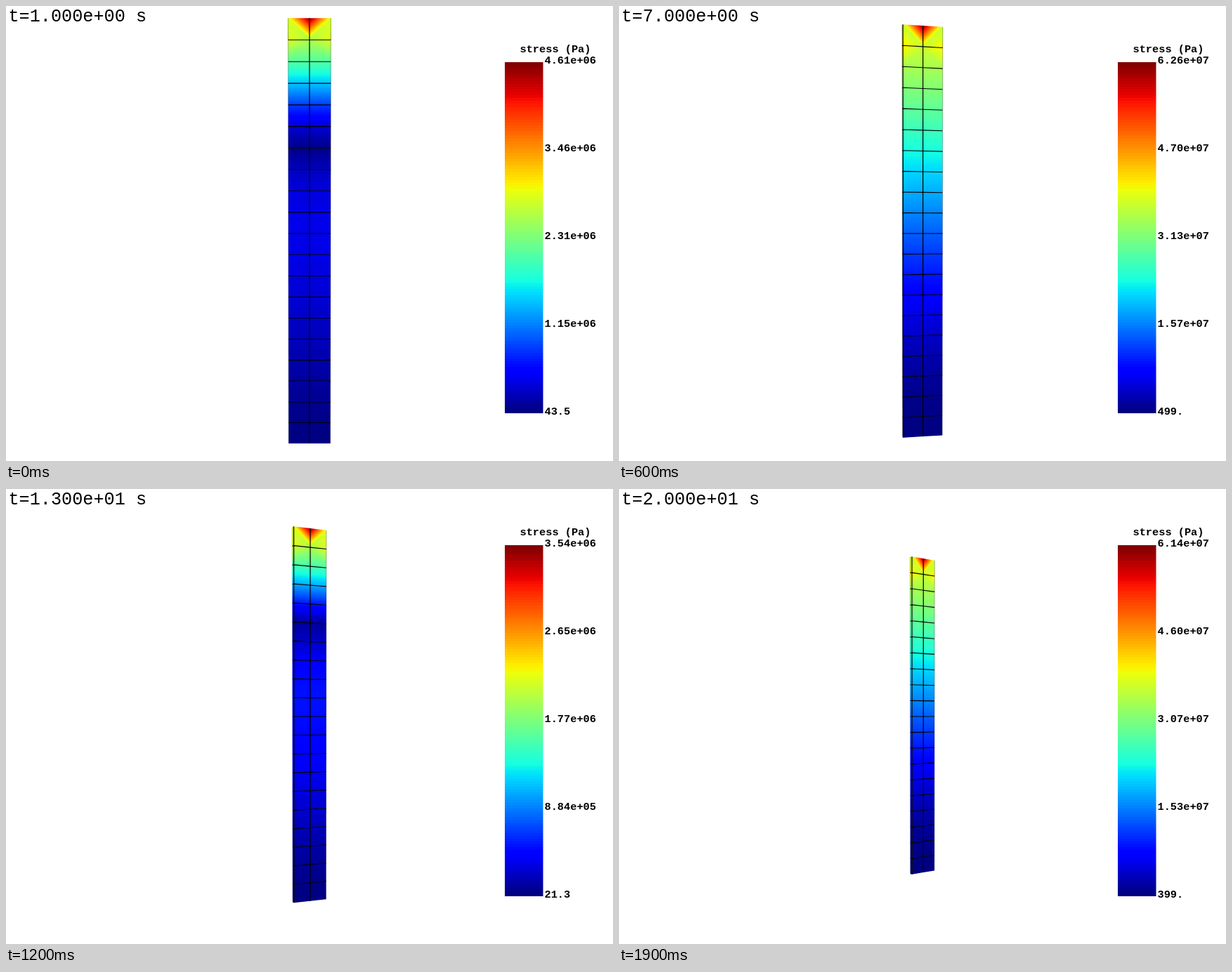
Write an HTML page with a canvas that moves like this. It is 864 by 648 pixels and loops after 2000 ms.

```html
<!DOCTYPE html>
<html lang="en">
<head>
<meta charset="utf-8">
<title>Beam stress</title>
<style>
  html, body { margin: 0; width: 100%; height: 100%; overflow: hidden; background: #fff; }
  canvas, svg { position: absolute; left: 0; top: 0; width: 864px; height: 648px; }
  text { font-family: "Liberation Mono", "Courier New", monospace; white-space: pre; }
  #clock { font-size: 25.2px; }
  #bar text { font-size: 15.3px; font-weight: bold; }
</style>
</head>
<body>
<canvas id="stage" width="864" height="648"></canvas>
<svg viewBox="0 0 864 648">
  <text id="clock" x="3.5" y="22"></text>
  <g id="bar"><text x="731.5" y="66">stress (Pa)</text></g>
</svg>
<script>
const ctx = document.getElementById('stage').getContext('2d');
const clock = document.getElementById('clock');
const ROWS = 20, SECONDS = 20, STEP_MS = 100;
const HALF = { width: 30, height: 302.3, depth: 2.4 };

// Key loads: second, peak stress (1e7 Pa), lowest stress (Pa), share of the bent profile
const LOADS = [
  [1, .4612, 43.5, 0],
  [3, 2.48, 96.1, .85],
  [7, 6.262, 499, 1],
  [10, 3, 180, .93],
  [13, .3537, 21.3, -.14],
  [15, 2.04, 5.84, .7],
  [20, 6.137, 399, 1]
];

const mix = (a, b, u) => a + (b - a) * u;
const clamp = v => Math.min(1, Math.max(0, v));

function jet(v) {
  const r = Math.min((v - .35) / .31, .5 + (1 - v) / .22);
  const g = Math.min((v - .125) / .25, (.91 - v) / .27);
  const b = Math.min(.5 + v / .22, (.65 - v) / .31);
  return `rgb(${[r, g, b].map(c => Math.round(255 * clamp(c)))})`;
}

// The beam swings freely; the key loads correct the ideal swing
const swing = sec => 6.2 * Math.sin(Math.PI * sec / 12.8) ** 2;

function loadAt(sec) {
  const i = Math.min(LOADS.length - 2, LOADS.findLastIndex(k => k[0] <= sec));
  const a = LOADS[i], b = LOADS[i + 1], u = (sec - a[0]) / (b[0] - a[0]);
  return {
    peak: swing(sec) + mix(a[1] - swing(a[0]), b[1] - swing(b[0]), u),
    low: mix(a[2], b[2], u),
    bend: mix(a[3], b[3], u)
  };
}

// Curvature of a cantilever's first mode, s = 0 at the clamp and 1 at the tip
function bent(s) {
  const x = 1.8751 * s;
  return .32 * (Math.cosh(x) + Math.cos(x) - .7341 * (Math.sinh(x) + Math.sin(x)));
}
// Near rest, only the clamp is loaded and the rest curves back slightly
const slack = s => .62 * Math.exp(-((s / .215) ** 2)) - .54 * s * (1 - s) ** 1.5;

// Turns the beam about its axis while it recedes
function projector(sec) {
  const t = sec - 1, angle = .046 * t - .0003 * t * t;
  const cos = Math.cos(angle), sin = Math.sin(angle);
  return (x, y, z) => {
    const near = (z + .054 * y) * cos - x * sin;
    const scale = 1 / (1 + .00098 * t * t - .00078 * near);
    return [432 + scale * (x * cos + z * sin), 324 - scale * y];
  };
}

function path(points) {
  ctx.beginPath();
  points.forEach(p => ctx.lineTo(p[0], p[1]));
}

// Fills a shape with the stress plane through its first three corners [x, y, stress]
function fill(...corners) {
  const [a, b, c] = corners;
  const [x1, y1, v1] = b.map((n, i) => n - a[i]);
  const [x2, y2, v2] = c.map((n, i) => n - a[i]);
  const det = x1 * y2 - x2 * y1;
  const gx = (v1 * y2 - v2 * y1) / det, gy = (x1 * v2 - x2 * v1) / det;
  const size = gx * gx + gy * gy;
  ctx.fillStyle = jet(a[2]);
  if (size > 1e-12) {
    const at = v => [a[0] + gx * (v - a[2]) / size, a[1] + gy * (v - a[2]) / size];
    const paint = ctx.createLinearGradient(...at(0), ...at(1));
    for (let i = 0; i <= 100; i++) paint.addColorStop(i / 100, jet(i / 100));
    ctx.fillStyle = paint;
  }
  path(corners);
  ctx.fill();
}

function fillStrip(outer, inner) {
  for (let r = 0; r < ROWS; r++) {
    const a = outer[r], b = inner[r], c = inner[r + 1], d = outer[r + 1];
    if (r === 0) {
      fill(a, b, c, d);
      fill(a, c, d);
    } else {
      fill(b, a, d, c);
      if (r === 1) fill(b, d, c);
    }
  }
}

function line(points, width, color = '#000') {
  path(points);
  ctx.lineWidth = width;
  ctx.strokeStyle = color;
  ctx.stroke();
}

function drawBeam(sec, bend) {
  const project = projector(sec);
  const body = r => Math.abs(mix(slack(r / ROWS), bent(r / ROWS), bend));
  const edgeStress = r => r > 1 ? body(r) : .62 + bend * (r ? .04 : -.03);
  const midStress = r => r ? body(r) : 1;
  const column = (x, z, stress) => Array.from({ length: ROWS + 1 }, (_, r) =>
    [...project(x * HALF.width, (1 - 2 * r / ROWS) * HALF.height, z * HALF.depth), stress(r)]);

  const back = column(-1, -1, edgeStress);
  const left = column(-1, 1, edgeStress);
  const mid = column(0, 1, midStress);
  const right = column(1, 1, edgeStress);
  const sideVisible = left[0][0] - back[0][0] > .4;

  if (sideVisible) fillStrip(back, left);
  fillStrip(left, mid);
  fillStrip(right, mid);

  for (let r = 1; r < ROWS; r++) {
    line([...(sideVisible ? [back[r]] : []), left[r], mid[r], right[r]], 1.1);
  }
  line(mid, 1.2);
  if (sideVisible) line(left, 1.2);
  line(sideVisible ? back : left, .6, 'rgba(0,0,0,.5)');
  line(right, .6, 'rgba(0,0,0,.5)');
}

function drawBar() {
  const bands = 128, top = 80, height = 500;
  const edge = i => top + Math.round(height * i / bands);
  for (let i = 0; i < bands; i++) {
    ctx.fillStyle = jet(1 - i / (bands - 1));
    ctx.fillRect(710, edge(i), 54.5, edge(i + 1) - edge(i));
  }
}

const exp = (v, digits) => v.toExponential(digits).replace(/\+(\d)$/, '+0$1');
const short = v => v >= 100 ? v.toFixed(0) + '.' : v.toPrecision(3);

const labels = [0, 1, 2, 3, 4].map(i => {
  const el = document.createElementNS('http://www.w3.org/2000/svg', 'text');
  el.setAttribute('x', 766.5);
  el.setAttribute('y', 82 + 125.1 * i);
  return document.getElementById('bar').appendChild(el);
});

let shown = 0;
function tick() {
  const sec = 1 + Math.floor(performance.now() / STEP_MS) % SECONDS;
  if (sec !== shown) {
    shown = sec;
    const { peak, low, bend } = loadAt(sec);
    ctx.clearRect(0, 0, 864, 648);
    drawBar();
    drawBeam(sec, bend);
    clock.textContent = `t=${exp(sec, 3)} s`;
    labels.forEach((el, i) => {
      el.textContent = i < 4 ? exp(peak * 1e7 * (1 - i / 4), 2) : short(low);
    });
  }
  requestAnimationFrame(tick);
}
tick();
</script>
</body>
</html>
```
